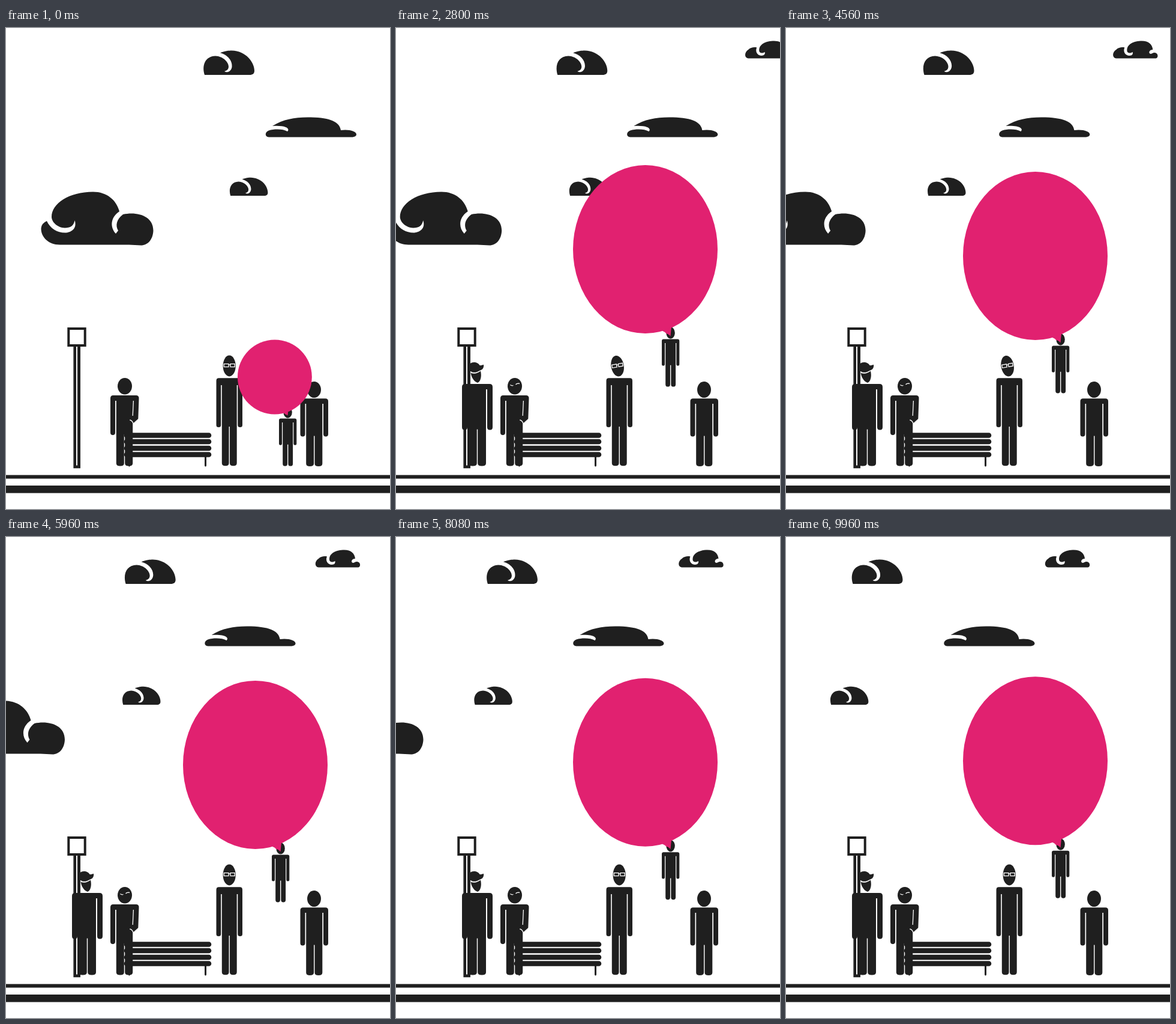
Write an HTML page that moves like this. It is 640 px wide and 800 px high and loops after 10000 ms.

```html
<!DOCTYPE html>
<html lang="en">
<head>
<meta charset="utf-8">
<title>Balloon lift</title>
<style>
  html, body { margin: 0; height: 100%; overflow: hidden; background: #fff; }
  svg { display: block; width: 100vw; height: 100vh; fill: #1f1f1f; }
  .line { fill: none; stroke: #fff; stroke-width: 1.3; }
</style>
</head>
<body>
<svg viewBox="0 0 640 800">
  <defs>
    <path id="puff" d="M331 78C326 62 332 47 349 46.5C362 47 371 57 371 64C371 69 368 71 364 72C368 75 375 73 376.5 65C378 55 369 44 357 41.5C364 38 372 37.5 376 37.5C400 38 414 57 414 71C414 76 411 78 406 78Z"/>
  </defs>

  <g class="cloud" data-speed="22.04"><use href="#puff"/></g>
  <g class="cloud" data-speed="17.02"><path d="M438 181.5C431 181 431 173 438 170.5C448 167.5 462 168 469 172C474 167 466 161.5 444 163C462 152 480 148.5 503 148.5C540 148.5 556 156 558 170C572 168 584 172 584 177C584 180 580 181.5 576 181.5Z"/></g>
  <g class="cloud" data-speed="30.02"><use href="#puff" transform="translate(125.9 220.5) scale(.75)"/></g>
  <g class="cloud" data-speed="24.75"><path d="M68 321C74 334 86 341 100 340.5C113 339 118 330 114.5 320C113 329 107 332.5 98 332.5C86 332 76 323 76 314C76 292 105 272.5 145 272.5C168 272.5 184 286 189 305C174 315 173 331 183 342L187 337C182 329 184 318 195 310C218 305 245.5 312 245.5 337C245 352 236 361.5 225 361.5L205 360.5H90C70 360.5 58 347 58.5 333Q59 325 68 321Z"/></g>
  <g class="cloud" data-speed="20.98"><path transform="translate(209 0)" d="M437 50.5C430 50 430 40 437 36C441 32 447 31.5 451 32.5C448 39 452 46 459 46C464 46 465 43 464.5 40C462 42 455 43 455 37C455 27 466 21.5 480 21.5C491 21.5 497 27 498 36C494 36 491 39 492.5 42C495 45 497 41 501 41C507 41 508 50 503 50.5Z"/></g>

  <path d="M0 743.5H640V749.5H0ZM0 761H640V773.5H0Z"/>
  <path fill-rule="evenodd" d="M102.3 498H133.7V530H102.3ZM106.3 502V526H129.7V502ZM112.4 530H124V732.3H112.4ZM117 530V727.5H119V530Z"/>
  <path d="M201 677.5H338M201 688H338M201 699H338M201 709.5H338" stroke="#1f1f1f" stroke-width="8.6" stroke-linecap="round"/>
  <path d="M331 712H334V728Q332.5 731 331 728ZM204 712H207V728Q205.5 731 204 728Z"/>

  <g id="walker">
    <path class="body" data-shape="110 51 9 2 592 601 668.5 728.5"/>
    <g id="capHead">
      <path d="M123 570C119 560 124 556 130 556C134 556 138 558 139.5 561C142 562 144 560 146 560C147 566 143 569 139 570C134 573.5 128 574 123 570Z"/>
      <path d="M124.5 573.5C130 576 136 574.5 141 570.5C143.5 581 140 589 136 590C130 588 125.5 581 124.5 573.5Z"/>
    </g>
  </g>

  <g id="thinker">
    <path class="body" data-shape="174 47 8 1.8 611 620 677 728.5" data-bent="1"/>
    <path d="M210 611H216.5Q222 611 221.5 616.5L220.3 650L212.5 657L207 651L210 646Z"/>
    <path class="line" d="M212.4 620L211.2 645M206.3 652Q210 652.5 212 657.5"/>
    <ellipse cx="198" cy="595.7" rx="12" ry="13.7"/>
    <path id="eyes" class="line" d="M190.5 593.5Q193 595.5 195.5 594.5M199.5 593Q202 590.5 206 591.5"/>
  </g>

  <path class="body" data-shape="350.5 43.5 7.7 1.6 582.3 594 664 728.3"/>
  <g id="watcher">
    <ellipse cx="372.2" cy="562" rx="10.6" ry="17.4"/>
    <path class="line" d="M363.3 558.6H371V563.6H363.3ZM374 558.6H381.2V563.6H374ZM371 560.2H374"/>
  </g>

  <path class="body" data-shape="490.5 46.5 8 1.7 616.3 625 679.5 729"/>
  <ellipse cx="513.5" cy="601.5" rx="11.5" ry="13.6"/>

  <g id="kid">
    <path class="body" data-shape="455 29.3 5 1.2 649.5 656 693.7 728.5"/>
    <ellipse cx="469.6" cy="639" rx="7.2" ry="9.7"/>
    <g id="balloon" fill="#e12170">
      <ellipse cx="-42" cy="-144.5" rx="120.5" ry="140"/>
      <path d="M-14-9Q-9-7-7-4Q-5-5 0 0L1.5-15Z"/>
    </g>
  </g>
</svg>
<script>
const $ = id => document.getElementById(id);
const clamp = v => Math.min(1, Math.max(0, v));
const span = (t, from, to) => clamp((t - from) / (to - from));
const sine = p => (1 - Math.cos(Math.PI * p)) / 2;
const place = (id, transform) => $(id).setAttribute('transform', transform);

// Rounded limb end, drawn from right to left
const tip = (y, w) => {
  const r = Math.min(4.5, w * .5);
  return `V${y - r}q0 ${r} ${-w / 2} ${r}t${-w / 2} ${-r}`;
};

function body(x, w, arm, gap, top, slot, hand, foot, bent) {
  const r = w / 10, split = 1.4;
  const leg = (w - 2 * (arm + gap) - split) / 2;
  const right = bent ? `H${x + w - arm - gap}` : `H${x + w - r}q${r} 0 ${r} ${r}${tip(hand, arm)}V${slot}h${-gap}`;
  return `M${x} ${top + r}q0 ${-r} ${r} ${-r}${right}${tip(foot, leg)}V${hand - 1}h${-split}` +
    `${tip(foot, leg)}V${slot}h${-gap}${tip(hand, arm)}Z`;
}

for (const el of document.querySelectorAll('.body'))
  el.setAttribute('d', body(...el.dataset.shape.split(' ').map(Number), el.dataset.bent));

const clouds = document.querySelectorAll('.cloud');

function lift(t) {
  const bob = -126.3 - 5.7 * Math.cos((t - 2775) / 1240 * 2 * Math.PI);
  return t < 2775 ? -132 * sine(span(t, 1200, 2775)) : bob;
}

function draw(t) {
  for (const c of clouds) c.setAttribute('transform', `translate(${-c.dataset.speed * t / 1000} 0)`);

  const walk = span(t, 0, 1600);
  place('walker', `translate(${93 * (walk - 1)} 0)`);
  $('walker').setAttribute('opacity', walk);
  place('capHead', walk < 1 ? 'translate(267 0) scale(-1 1)' : '');

  $('eyes').setAttribute('opacity', t < 2000 ? 0 : 1);
  const tilt = sine(span(t, 1600, 2000)) - sine(span(t, 5000, 5400));
  place('watcher', `rotate(${-10 * tilt} 372 580)`);

  const air = span(t, 0, 1167);
  place('balloon', `translate(469.5 644.5) scale(${.514 + .486 * air} ${.443 + .557 * air})`);
  place('kid', `translate(${-12 * sine(span(t, 1200, 2775))} ${lift(t)})`);
}

function frame(now) {
  const t = now % 10000, step = t < 2800 ? 80 : 40;
  draw(Math.floor(t / step) * step);
  requestAnimationFrame(frame);
}
draw(0);
requestAnimationFrame(frame);
</script>
</body>
</html>
```
